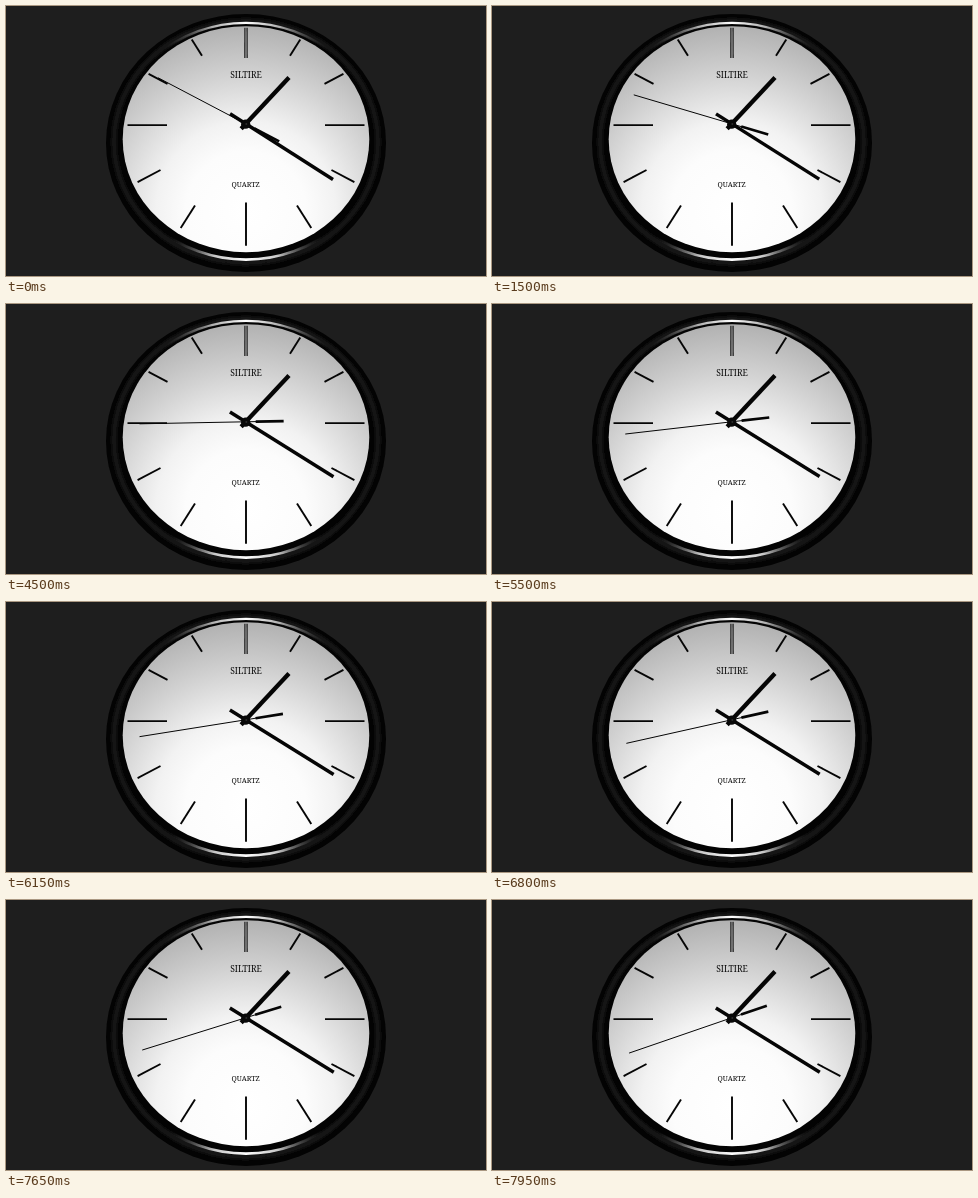
These frames come from a looping animation (480 px wide and 270 px high, 8 s). An HTML page:

```html
<!DOCTYPE html>
<html lang="en">
<head>
<meta charset="utf-8">
<title>Wall clock</title>
<style>
  html, body { margin: 0; width: 100%; height: 100%; overflow: hidden; background: #1e1e1e; }
  svg { display: block; width: 100vw; height: 100vh; }
  line { stroke: #050505; }
  text { font-family: "Noto Serif", "DejaVu Serif", serif; font-weight: 500; text-anchor: middle; fill: #0a0a0a; }
</style>
</head>
<body>
<svg viewBox="0 0 480 270">
  <defs>
    <radialGradient id="dial" gradientUnits="userSpaceOnUse" cx="240" cy="205" r="200">
      <stop offset="0" stop-color="#fff"/>
      <stop offset=".3" stop-color="#fcfcfc"/>
      <stop offset=".45" stop-color="#f2f2f2"/>
      <stop offset=".68" stop-color="#d2d2d2"/>
      <stop offset=".95" stop-color="#aeaeae"/>
    </radialGradient>
    <radialGradient id="shine" gradientUnits="userSpaceOnUse" cx="240" cy="17" r="85">
      <stop offset="0" stop-color="#fff"/>
      <stop offset=".4" stop-color="#ccc" stop-opacity=".85"/>
      <stop offset="1" stop-color="#444" stop-opacity="0"/>
    </radialGradient>
    <radialGradient id="glow" gradientUnits="userSpaceOnUse" cx="240" cy="254" r="80">
      <stop offset="0" stop-color="#fff"/>
      <stop offset=".4" stop-color="#ddd" stop-opacity=".9"/>
      <stop offset="1" stop-color="#333" stop-opacity="0"/>
    </radialGradient>
    <filter id="soft"><feGaussianBlur stdDeviation="1.5"/></filter>
    <filter id="edge"><feGaussianBlur stdDeviation=".4"/></filter>
  </defs>

  <rect width="480" height="270" fill="#1e1e1e"/>
  <ellipse cx="240" cy="137" rx="140" ry="129" fill="#030303"/>
  <g fill="none">
    <ellipse cx="240" cy="136" rx="132" ry="121" stroke="#141414" stroke-width="5" filter="url(#soft)"/>
    <ellipse cx="240" cy="135.2" rx="130" ry="118.4" stroke="url(#glow)" stroke-width="2.8" filter="url(#edge)"/>
    <ellipse cx="240" cy="135.2" rx="130" ry="118.4" stroke="url(#shine)" stroke-width="2.2"/>
  </g>
  <ellipse cx="240" cy="133.2" rx="123.3" ry="113" fill="url(#dial)"/>

  <g id="ticks"></g>
  <text x="240" y="72.4" font-size="8.5">SILTIRE</text>
  <text x="239.7" y="181.2" font-size="7.1">QUARTZ</text>
  <g id="hands"></g>
  <circle cx="239.7" cy="118.2" r="4.6" fill="#080808"/>
  <circle cx="240.3" cy="118" r="1" fill="#2c2c2c"/>
</svg>
<script>
  const SQUASH = 0.91, DEPTH = 0.0009;
  const DIAL = [240, 119.1], AXLE = [239.7, 117.8];
  const LOOP = 8000, STEP = 50, START = 49.5;

  // Point on the tilted dial: clockwise degrees from 12, radius, sideways shift.
  function project([cx, cy], deg, r, side = 0) {
    const a = deg * Math.PI / 180;
    const x = r * Math.sin(a) + side * Math.cos(a);
    const y = -r * Math.cos(a) + side * Math.sin(a);
    const w = 1 - DEPTH * y;
    return [cx + x / w, cy + SQUASH * y / w];
  }

  function addLine(parent, width) {
    const el = document.createElementNS("http://www.w3.org/2000/svg", "line");
    el.setAttribute("stroke-width", width);
    return document.getElementById(parent).appendChild(el);
  }

  function place(el, origin, deg, from, to, side) {
    const [x1, y1] = project(origin, deg, from, side);
    const [x2, y2] = project(origin, deg, to, side);
    Object.entries({ x1, y1, x2, y2 }).forEach(([k, v]) => el.setAttribute(k, v.toFixed(2)));
  }

  for (let h = 0; h < 12; h++) {
    const inner = h % 3 ? 94.5 : 79;
    const sides = h ? [0] : [-1.2, 1.2];
    for (const side of sides) {
      place(addLine("ticks", h ? 1.9 : 1.1), DIAL, h * 30, inner, 118.5, side);
    }
  }

  const hour = addLine("hands", 4.3);
  const minute = addLine("hands", 3.5);
  const second = addLine("hands", 1);
  const tail = addLine("hands", 2.6);

  // The clock runs backwards: plain ticks, ticks with a small rebound, then a sweep.
  function secondsAt(t) {
    const s = START - t / 1000;
    if (t >= 5950) return s;
    const bounce = t >= 4500 && (t - 500) % 1000 < 50 ? 0.2 : 0;
    return Math.ceil(s) - bounce;
  }

  function draw(now) {
    const t = Math.floor((now % LOOP) / STEP) * STEP;
    const s = secondsAt(t);
    const m = 20 + s / 60;
    place(hour, AXLE, 30 + m / 2, -7, 70);
    place(minute, AXLE, m * 6, -19.3, 101);
    place(second, AXLE, s * 6, -12, 106);
    place(tail, AXLE, s * 6, -10, -38);
    requestAnimationFrame(draw);
  }
  draw(performance.now());
</script>
</body>
</html>
```
